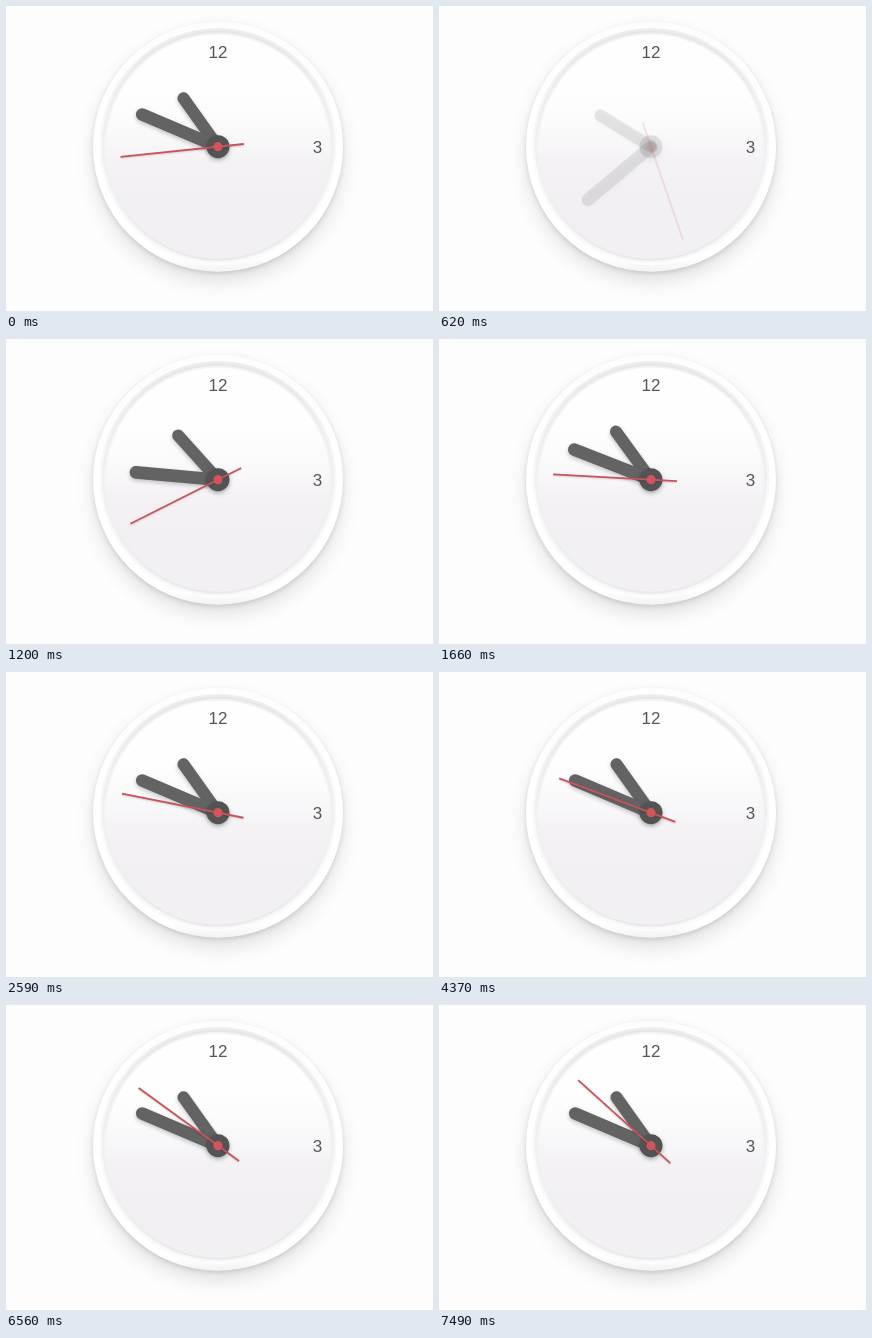
An HTML page with a canvas for the animation above (7700 ms loop, 427 by 305 pixels).

```html
<!DOCTYPE html>
<html lang="en">
<head>
<meta charset="utf-8">
<title>Clock</title>
<style>
html, body { margin: 0; width: 100%; height: 100%; overflow: hidden; background: #fdfdfd; }
canvas { display: block; width: 427px; height: 305px; }
</style>
</head>
<body>
<canvas width="427" height="305"></canvas>
<script>
const ctx = document.querySelector('canvas').getContext('2d');
const LOOP = 7700, STEP = 58;
const CX = 212, CY = 140.7;
const RELOAD = 500, INTRO = 558, INTRO_LENGTH = 1300, FADE = 440;
const TICKS = [2430, 3400, 4370, 5300, 6270, 7200];
const TICK_LENGTH = 360;
const HOUR = 324.5, MINUTE = 293;

const clamp = v => Math.min(1, Math.max(0, v));
const held = elapsed => Math.floor(elapsed / STEP) * STEP;

function pose(t) {
  if (t < RELOAD) return { hour: HOUR, minute: MINUTE, second: 264, alpha: 1 };
  const age = held(Math.max(0, t - INTRO));
  const left = (1 - clamp(age / INTRO_LENGTH)) ** 2;
  let second = 276 - 126 * left;
  for (const start of TICKS) {
    if (t < start) break;
    const u = clamp((held(t - start) + 60) / TICK_LENGTH);
    second += 6 * (1 - (1 - u) ** 3);
  }
  return {
    hour: HOUR - 25 * left,
    minute: MINUTE - 69 * left,
    second,
    alpha: t < INTRO ? 0 : clamp(age / FADE)
  };
}

function shadow(color, blur, y) {
  ctx.shadowColor = color;
  ctx.shadowBlur = blur;
  ctx.shadowOffsetY = y;
}

function noShadow() {
  shadow('transparent', 0, 0);
}

function disc(r, fill, x = CX, y = CY) {
  ctx.beginPath();
  ctx.arc(x, y, r, 0, Math.PI * 2);
  ctx.fillStyle = fill;
  ctx.fill();
}

function vertical(y0, y1, stops) {
  const g = ctx.createLinearGradient(0, y0, 0, y1);
  stops.forEach(([at, color]) => g.addColorStop(at, color));
  return g;
}

function drawBody() {
  ctx.fillStyle = '#fdfdfd';
  ctx.fillRect(0, 0, 427, 305);

  shadow('rgba(70,70,75,.17)', 19, 10);
  disc(124, '#fff');
  shadow('rgba(70,70,75,.20)', 5, 2);
  disc(124.5, '#fff');
  noShadow();
  disc(125, vertical(16, 266, [[0, '#fdfdfd'], [.5, '#fff'], [.94, '#fff'], [1, '#f3f3f4']]));

  // Soft groove between rim and face
  disc(118.5, vertical(22, 259, [[0, '#ececed'], [.25, '#f3f3f4'], [.6, '#fafafa'], [1, '#fcfcfc']]));
  disc(116, vertical(25, 257, [[0, '#e6e6e8'], [.3, '#ededef'], [.7, '#f2f2f4'], [1, '#f7f7f8']]));
  disc(114, vertical(27, 255, [[0, '#f3f3f4'], [.5, '#f4f4f5'], [1, '#e9e8ea']]));
  disc(112, vertical(88, 186, [[0, '#fefefe'], [.35, '#fbfafb'], [.7, '#f4f2f5'], [1, '#f2f0f3']]));

  ctx.font = '17px "Liberation Sans", Arial, sans-serif';
  ctx.textAlign = 'center';
  ctx.fillStyle = '#555';
  ctx.fillText('12', 212, 52);
  ctx.fillText('3', 311.5, 147);
}

function drawHand(angle, length, tail, width, color, cap) {
  const a = angle * Math.PI / 180, dx = Math.sin(a), dy = -Math.cos(a);
  ctx.beginPath();
  ctx.moveTo(CX - dx * tail, CY - dy * tail);
  ctx.lineTo(CX + dx * length, CY + dy * length);
  ctx.lineWidth = width;
  ctx.lineCap = cap;
  ctx.strokeStyle = color;
  ctx.stroke();
}

function drawHands({ hour, minute, second, alpha }) {
  ctx.globalAlpha = alpha;
  shadow('rgba(0,0,0,.22)', 4, 2);
  drawHand(hour, 59.5, 0, 12, '#636363', 'round');
  drawHand(minute, 82.4, 0, 12.6, '#636363', 'round');
  shadow('rgba(0,0,0,.3)', 4, 2);
  disc(11.5, '#535353');
  shadow('rgba(0,0,0,.15)', 2, 1);
  drawHand(second, 98, 26, 1.8, '#c9525a', 'butt');
  noShadow();
  disc(4.6, '#d2555a');
  ctx.globalAlpha = 1;
}

function frame(now) {
  drawBody();
  const state = pose(now % LOOP);
  if (state.alpha > 0) drawHands(state);
}

const begin = performance.now();
function run() {
  frame(performance.now() - begin);
  requestAnimationFrame(run);
}
run();
</script>
</body>
</html>
```
